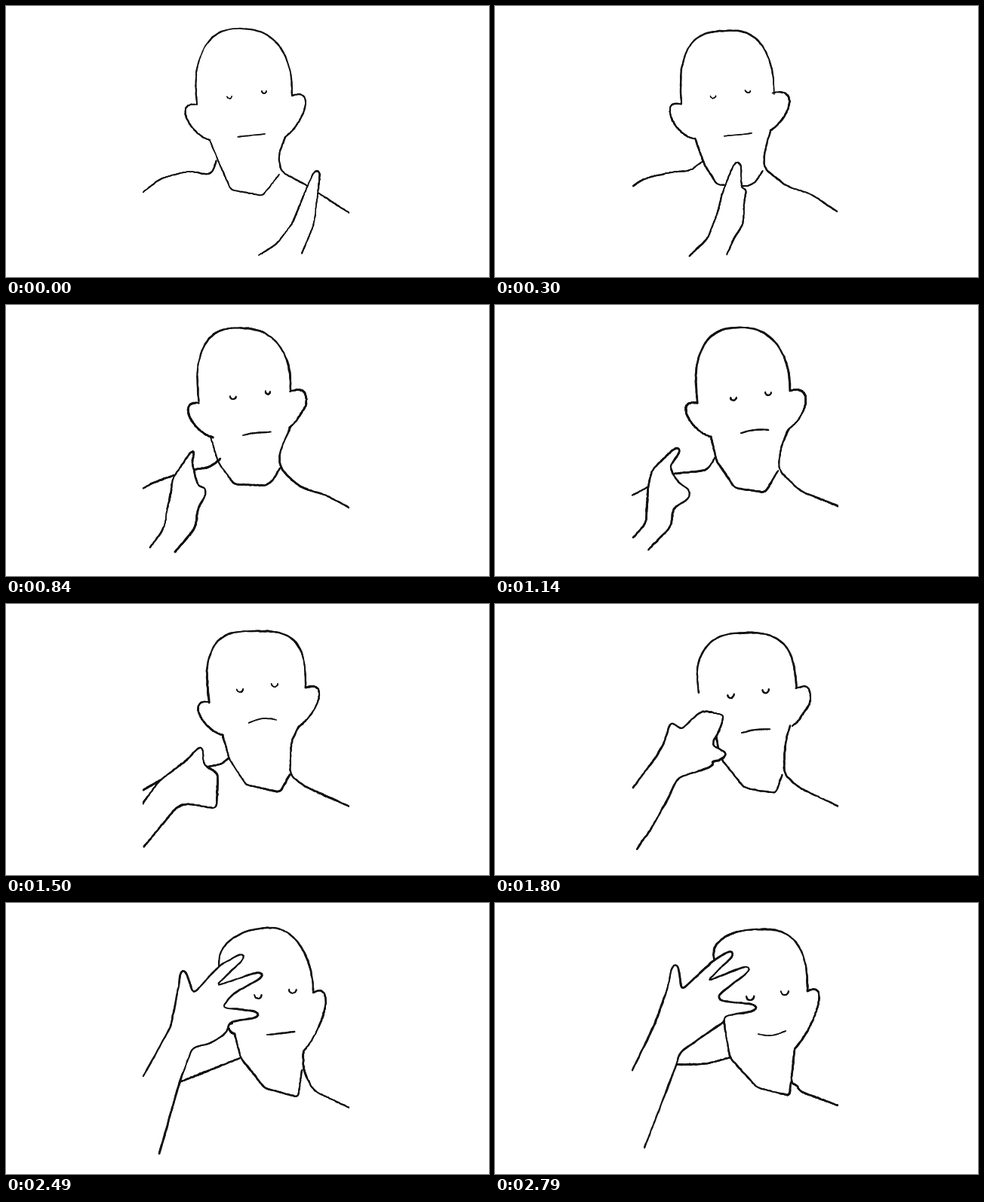
These frames come from a looping animation (640 px wide and 360 px high, 2.85 s). An HTML page with a canvas:

```html
<!DOCTYPE html>
<html lang="en">
<head>
<meta charset="utf-8">
<title>Pencil portrait</title>
<style>
  html, body { margin: 0; width: 100%; height: 100%; overflow: hidden; background: #fff; }
  canvas { display: block; width: 640px; height: 360px; }
</style>
</head>
<body>
<canvas id="stage" width="640" height="360"></canvas>
<script>
const ctx = document.getElementById('stage').getContext('2d');
const LOOP = 2850, LAST = 37;

// Key poses; "at" is the drawing number in the loop.
// head: left side, crown, right side; square: roundness of its two halves.
// earL: top and lobe; earR: lobe; eye: left one; mouth: left end; * marks a fingertip.
const poses = [
  {
    at: 0, head: '249,131 309,30 379,119', square: [2.5, 2.4], earL: '253,131 270,178', earR: '370,174',
    jaw: '283,210 298,244 340,252 362,224', eye: '296,120', mouth: '307,174', bow: 0,
    shL: '182,247 205,229 243,219 272,225 279,205', shR: '361,198 364,220 398,238 455,275',
    hand: '335,331 358,317 380,288 397,245 413,218* 413,250 408,290 392,329'
  },
  {
    at: 7, head: '239,129 308,33 362,114', square: [3.2, 2.4], earL: '243,130 260,174', earR: '362,159',
    jaw: '271,209 290,234 340,231 350,215', eye: '285,119', mouth: '303,173', bow: 0,
    shL: '182,235 191,228 273,209', shR: '350,200 351,215 378,242 418,248 453,270',
    hand: '198,333 225,300 236,238 257,189* 261,239 273,236 267,292 242,331'
  },
  {
    at: 15, head: '264,130 327,30 391,114', square: [2.8, 2.2], earL: '268,130 286,175', earR: '389,165',
    jaw: '294,208 318,243 358,249 375,220', eye: '316,123', mouth: '326,170', bow: -2,
    shL: '182,253 235,224 281,220 292,202', shR: '379,188 375,218 404,247 455,267',
    hand: '183,309 200,290 203,240 208,219 244,190* 231,215 242,235 259,247 256,258 236,270 233,295 203,325'
  },
  {
    at: 20, head: '265,131 335,36 397,111', square: [3.5, 3], earL: '270,130 287,174', earR: '388,163',
    jaw: '296,206 318,240 363,250 376,227', eye: '310,113', mouth: '322,158', bow: -4,
    shL: '182,247 210,231 265,216 283,214 295,205', shR: '378,182 376,227 395,242 455,269',
    hand: '181,265 203,235 240,207 259,190* 261,213 281,225 279,272 239,265 226,270 183,322'
  },
  {
    at: 28, head: '267,107 340,38 402,111', square: [2.5, 2.05], earL: '295,162 297,181', earR: '397,163',
    jaw: '302,202 342,248 384,253 387,228', eye: '314,126', mouth: '333,182', bow: 0,
    shL: '215,222 272,213 300,201', shR: '389,195 387,228 408,247 455,270',
    hand: '184,224 224,173 231,150 237,100* 252,125 300,90 340,85* 299,122 298,133 335,139* 302,147 309,153 306,163 284,180 254,198 196,332'
  },
  {
    at: 33, head: '279,90 352,33 407,119', square: [2.2, 2], earL: '300,160 303,174', earR: '394,197',
    jaw: '311,206 343,246 387,258 392,222', eye: '334,122', mouth: '346,175', bow: 0,
    shL: '210,243 230,238 310,206', shR: '394,222 407,249 455,272',
    hand: '182,230 218,165 229,110 234,89* 248,121 282,84 315,69* 278,110 340,94* 300,121 286,139 335,148* 296,158 293,172 270,187 247,192 230,238 203,333'
  },
  {
    at: 37, head: '287,80 355,35 414,117', square: [2.5, 2.6], earL: '303,150 303,155', earR: '397,194',
    jaw: '311,205 347,245 390,256 392,238', eye: '338,124', mouth: '349,174', bow: 4,
    shL: '215,215 280,214 312,205', shR: '392,240 400,241 403,250 455,269',
    hand: '182,222 212,160 229,112 239,81* 247,116 290,76 315,65* 281,104 337,86* 296,122 298,130 347,139* 305,150 303,158 245,198 240,216 198,325'
  }
];

const mix = (a, b, k) => a + (b - a) * k;
const mixPt = (a, b, k) => [mix(a[0], b[0], k), mix(a[1], b[1], k)];
const gap = (a, b) => Math.hypot(b[0] - a[0], b[1] - a[1]);
const add = (p, x, y) => [p[0] + x, p[1] + y];
const sample = (n, f) => Array.from({ length: n + 1 }, (_, i) => f(i / n));

function rand(n) {
  const s = Math.sin(n * 127.1 + 11.7) * 43758.5453;
  return s - Math.floor(s);
}

// Smooth value noise in -1..1
function noise(x) {
  const i = Math.floor(x), f = x - i;
  return mix(rand(i), rand(i + 1), f * f * (3 - 2 * f)) * 2 - 1;
}

const bezier = (a, b, c, d) => sample(30, t => {
  const m = mixPt(mixPt(a, b, t), mixPt(b, c, t), t);
  return mixPt(m, mixPt(mixPt(b, c, t), mixPt(c, d, t), t), t);
});

// Points of a line; each fingertip is widened into a cap.
function points(text) {
  const marks = text.split(' ');
  const p = marks.map(s => s.split(',').map(parseFloat));
  return p.flatMap((tip, i) => {
    if (!marks[i].endsWith('*')) return [tip];
    const base = mixPt(p[i - 1], p[i + 1], 0.5), len = gap(base, tip), r = 4.5;
    const ux = (tip[0] - base[0]) / len * r, uy = (tip[1] - base[1]) / len * r;
    const c = add(tip, -ux, -uy);
    const side = (p[i - 1][0] - p[i + 1][0]) * -uy + (p[i - 1][1] - p[i + 1][1]) * ux < 0 ? -1 : 1;
    return [add(c, -uy * side, ux * side), tip, add(c, uy * side, -ux * side)];
  });
}

// Straight runs with rounded corners
function rounded(p, radius) {
  const out = [p[0]];
  for (let i = 1; i < p.length - 1; i++) {
    const cut = q => mixPt(p[i], q, Math.min(0.48, radius / gap(p[i], q)));
    const a = cut(p[i - 1]), b = cut(p[i + 1]);
    out.push(...sample(6, t => mixPt(mixPt(a, p[i], t), mixPt(p[i], b, t), t)));
  }
  return [...out, p[p.length - 1]];
}

// Two superellipse quarters, drawn in a little above the left ear
function skull([left, top, right], [nl, nr]) {
  const quarter = (end, n, tuck) => sample(50, t => {
    const u = Math.cos(t * Math.PI / 2) ** (2 / n), v = Math.sin(t * Math.PI / 2) ** (2 / n);
    return [mix(top[0], end[0], u) + tuck * Math.max(0, 1 - 2.2 * v), mix(end[1], top[1], v)];
  });
  return [...quarter(left, nl, 4), ...quarter(right, nr, 0).reverse()];
}

function ear(a, b, side, rise, lift) {
  const h = gap(a, b), w = Math.min(32, h * 0.7) * side;
  return bezier(a, add(a, w, -h * rise), add(b, w * 0.8, -h * lift), b);
}

// Evenly spaced points along a curve
function resample(pts, n) {
  const dist = [0];
  for (let i = 1; i < pts.length; i++) dist.push(dist[i - 1] + gap(pts[i - 1], pts[i]));
  const total = dist[dist.length - 1];
  let j = 1;
  return sample(n, t => {
    while (j < pts.length - 1 && dist[j] < total * t) j++;
    return mixPt(pts[j - 1], pts[j], Math.min(1, (total * t - dist[j - 1]) / (dist[j] - dist[j - 1] || 1)));
  });
}

function build(pose) {
  const head = points(pose.head), [earTop, lobeL] = points(pose.earL), [lobeR] = points(pose.earR);
  const [eye] = points(pose.eye), [lip] = points(pose.mouth);
  const r = 3 + 2 * pose.at / LAST;
  const lid = (x, y) => sample(12, t => add(eye, x - r * Math.cos(t * Math.PI), y + r * Math.sin(t * Math.PI)));
  const curves = {
    head: skull(head, pose.square),
    earL: ear(earTop, lobeL, -1, 0.1, 0.13),
    earR: ear(head[2], lobeR, 1, 0.2, 0.35),
    jaw: rounded([lobeL, ...points(pose.jaw)], 5),
    shL: rounded(points(pose.shL), 10),
    shR: rounded([lobeR, ...points(pose.shR)], 10),
    eyeL: lid(0, 0),
    eyeR: lid(46, -7),
    mouth: sample(12, t => add(lip, 36 * t, -4 * t + pose.bow * Math.sin(t * Math.PI))),
    hand: rounded(points(pose.hand), 8)
  };
  const parts = {};
  for (const name in curves)
    parts[name] = resample(curves[name], name === 'hand' ? 300 : /eye|mouth/.test(name) ? 14 : 110);
  return { at: pose.at, parts };
}

const keys = poses.map(build);

function stroke(pts, pen, seed) {
  let run = 0;
  for (let i = 1; i < pts.length; i++) {
    run += gap(pts[i - 1], pts[i]);
    ctx.lineWidth = pen * (1 + 0.22 * noise(seed + run * 0.04) + 0.16 * noise(seed + 500 + run * 0.5));
    ctx.beginPath();
    ctx.moveTo(...pts[i - 1]);
    ctx.lineTo(...pts[i]);
    ctx.stroke();
  }
}

function draw(num) {
  let n = 0;
  while (n < keys.length - 2 && keys[n + 1].at <= num) n++;
  const a = keys[n], b = keys[n + 1];
  const k = (num - a.at) / (b.at - a.at);
  const loose = Math.sin(Math.PI * k) * 1.6;
  const pen = 1.9 + 0.5 * Math.min(1, num / 12);

  ctx.fillStyle = '#fff';
  ctx.fillRect(0, 0, 640, 360);
  ctx.save();
  ctx.beginPath();
  ctx.rect(181, 0, 274, 360);
  ctx.clip();
  ctx.strokeStyle = '#111';
  ctx.lineCap = 'round';

  Object.keys(a.parts).forEach((name, id) => {
    const seed = num * 97 + id * 1301;
    const shake = x => loose * noise(x * 0.04 + seed) + 0.3 * noise(x * 0.5 + seed);
    const pts = a.parts[name].map((p, i) =>
      add(mixPt(p, b.parts[name][i], k), shake(i), shake(i + 9000)));
    if (name === 'hand') {
      ctx.beginPath();
      pts.forEach(p => ctx.lineTo(...p));
      ctx.fill();
    }
    stroke(pts, /eye|mouth/.test(name) ? pen * 0.85 : pen, seed);
  });
  ctx.restore();
}

// Drawings are held for 90 ms and 60 ms in turn.
const start = performance.now();
let shown = -1;
function tick() {
  const t = (performance.now() - start) % LOOP;
  const num = 2 * Math.floor(t / 150) + (t % 150 >= 90 ? 1 : 0);
  if (num !== shown) draw(shown = num);
  requestAnimationFrame(tick);
}
tick();
</script>
</body>
</html>
```
